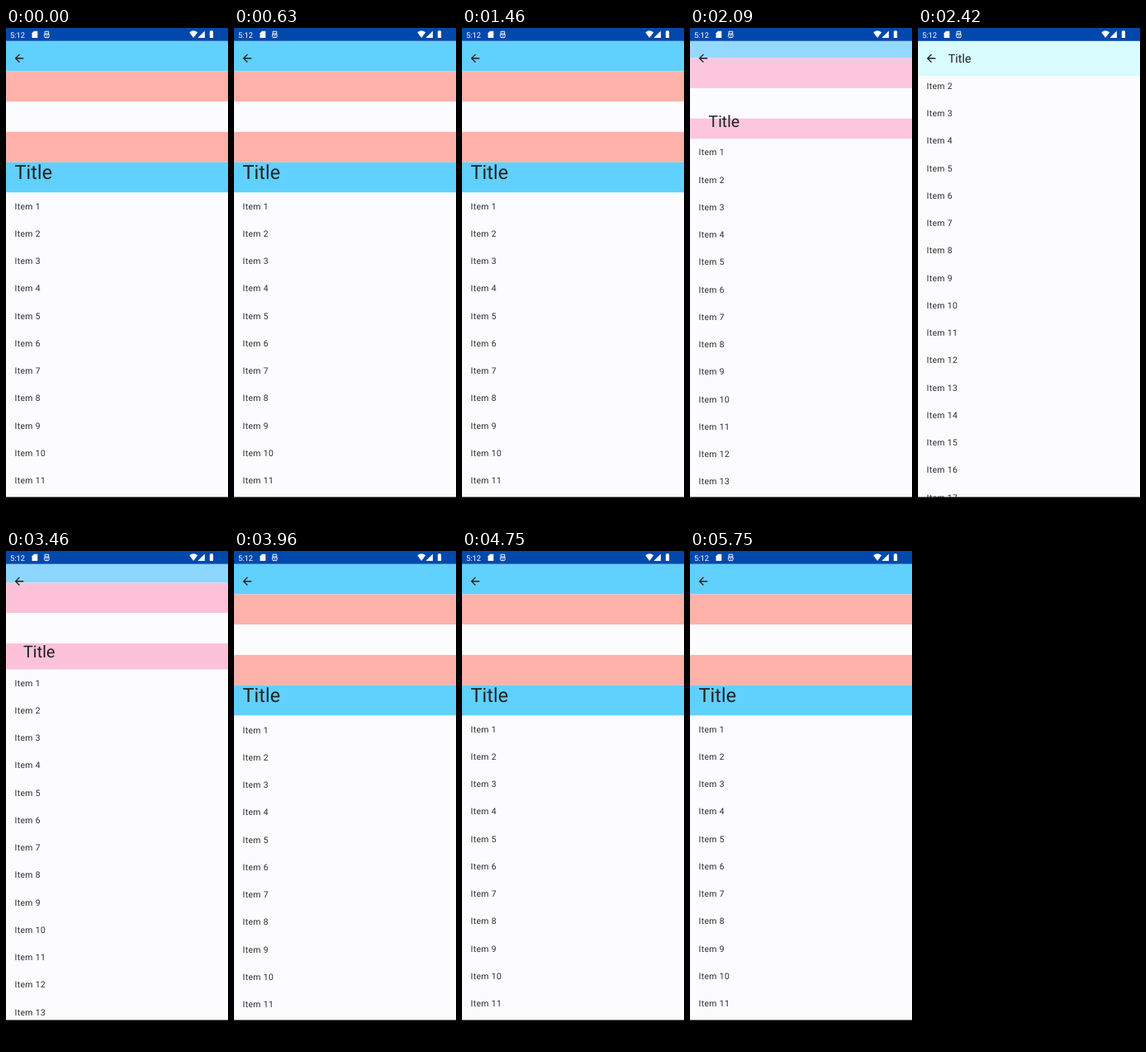
Recreate the animation shown at these times as an HTML page. Size 270x600 px, loop 5790 ms.

```html
<!DOCTYPE html>
<html lang="en">
<head>
<meta charset="utf-8">
<title>Collapsing header</title>
<style>
  html, body { margin: 0; width: 100%; height: 100%; overflow: hidden; background: #fcfcff; }
  svg { display: block; width: 270px; height: 600px; font-family: Roboto, sans-serif; text-rendering: geometricPrecision; }
  #items { font-size: 10.5px; letter-spacing: .33px; fill: #2c2c30; }
</style>
</head>
<body>
<svg viewBox="0 0 270 600">
  <defs>
    <clipPath id="headerClip"><rect id="headerBox" width="270"/></clipPath>
  </defs>
  <rect width="270" height="600" fill="#fcfcff"/>
  <g id="items"></g>
  <g clip-path="url(#headerClip)"><g id="stripes"></g></g>
  <text id="title" fill="#1f2122">Title</text>
  <path transform="translate(8.1 28.9) scale(.656)" fill="#1f2122"
    d="M20 11H7.83l5.59-5.59L12 4l-8 8 8 8 1.41-1.41L7.83 13H20z"/>

  <rect width="270" height="15.75" fill="#0048ac"/>
  <g fill="#fff">
    <text x="5" y="11.8" font-size="9.4">5:12</text>
    <path d="M34 3.8H38.4V12H31.6V6.2Z"/>
    <path d="M223 5.2Q228 1.4 233 5.2L228 12Z"/>
    <path d="M241.8 3.4V12H233.2Z"/>
    <path d="M247.8 3.8H249V3H251V3.8H252V12H247.8Z"/>
    <path d="M47.2 4.2H51.8V7.2H47.2ZM46.8 7.6H52.2V10.4Q52.2 11.6 51 11.6H48Q46.8 11.6 46.8 10.4ZM48.6 9.6H50.4" fill="none" stroke="#fff"/>
  </g>
  <rect y="568.5" width="270" height="31.5" fill="#000"/>
</svg>
<script>
const LOOP = 5790;
const DP = 270 / 1080 * 2.625; // stage pixels per density-independent pixel
const TOP = 24 * DP, EXPANDED = 280 * DP, RANGE = EXPANDED - 64 * DP;
const STRIPE = EXPANDED / 5, PARALLAX = .25;
const ITEM_PITCH = 33.25, ITEM_COUNT = 20;
const SCROLL_LENGTH = 214;

// Each stripe passes through a half-scrimmed tint on its way to the bar colour.
const BAR = [216, 252, 255], MIDWAY = .43;
const BLUE = { open: [96, 208, 252], mid: [144, 215, 255] };
const PINK = { open: [253, 177, 169], mid: [254, 196, 220] };
const WHITE = { open: [252, 252, 255], mid: [252, 252, 255] };
const STRIPES = [BLUE, PINK, WHITE, PINK, BLUE];

const $ = id => document.getElementById(id);
const mix = (a, b, k) => a + (b - a) * k;
const progress = (x, from, to) => Math.min(1, Math.max(0, (x - from) / (to - from)));
const ease = k => k * k * (3 - 2 * k);

function addShape(parent, tag, attrs, text = '') {
  const node = document.createElementNS('http://www.w3.org/2000/svg', tag);
  for (const name in attrs) node.setAttribute(name, attrs[name]);
  node.textContent = text;
  return parent.appendChild(node);
}

// Swipe up, swipe back down, then a slight overscroll.
function scrollAt(t) {
  const up = ease(progress(t, 1770, 2646));
  const down = ease(progress(t, 2912, 3738));
  const bounce = Math.sin(Math.PI * progress(t, 3738, 4090));
  return SCROLL_LENGTH * (up - down) - bounce;
}

function tint({ open, mid }, f) {
  const [from, to, k] = f < MIDWAY
    ? [open, mid, f / MIDWAY]
    : [mid, BAR, progress(f, MIDWAY, 1)];
  return `rgb(${from.map((c, i) => Math.round(mix(c, to[i], k)))})`;
}

for (let i = 0; i < ITEM_COUNT; i++) {
  addShape($('items'), 'text', { x: 16 * DP, y: 219.6 + i * ITEM_PITCH }, `Item ${i + 1}`);
}
const bands = STRIPES.map((_, i) =>
  addShape($('stripes'), 'rect', { y: TOP + i * STRIPE, width: 270, height: STRIPE }));
$('headerBox').setAttribute('y', TOP);

function draw(t) {
  const scroll = scrollAt(t);
  const f = progress(scroll, 0, RANGE);
  const collapsed = f * RANGE;

  $('items').setAttribute('transform', `translate(0 ${-scroll})`);
  $('headerBox').setAttribute('height', EXPANDED - collapsed);
  $('stripes').setAttribute('transform', `translate(0 ${-collapsed * PARALLAX})`);
  bands.forEach((band, i) => band.setAttribute('fill', tint(STRIPES[i], f)));

  const title = $('title');
  title.setAttribute('x', mix(16, 56, f) * DP);
  title.setAttribute('y', mix(183.4, 42.2, f) + 5 * f * (1 - f));
  title.setAttribute('font-size', mix(36, 22, f) * DP);
}

const start = performance.now();
function tick() {
  draw((performance.now() - start) % LOOP);
  requestAnimationFrame(tick);
}
tick();
</script>
</body>
</html>
```
